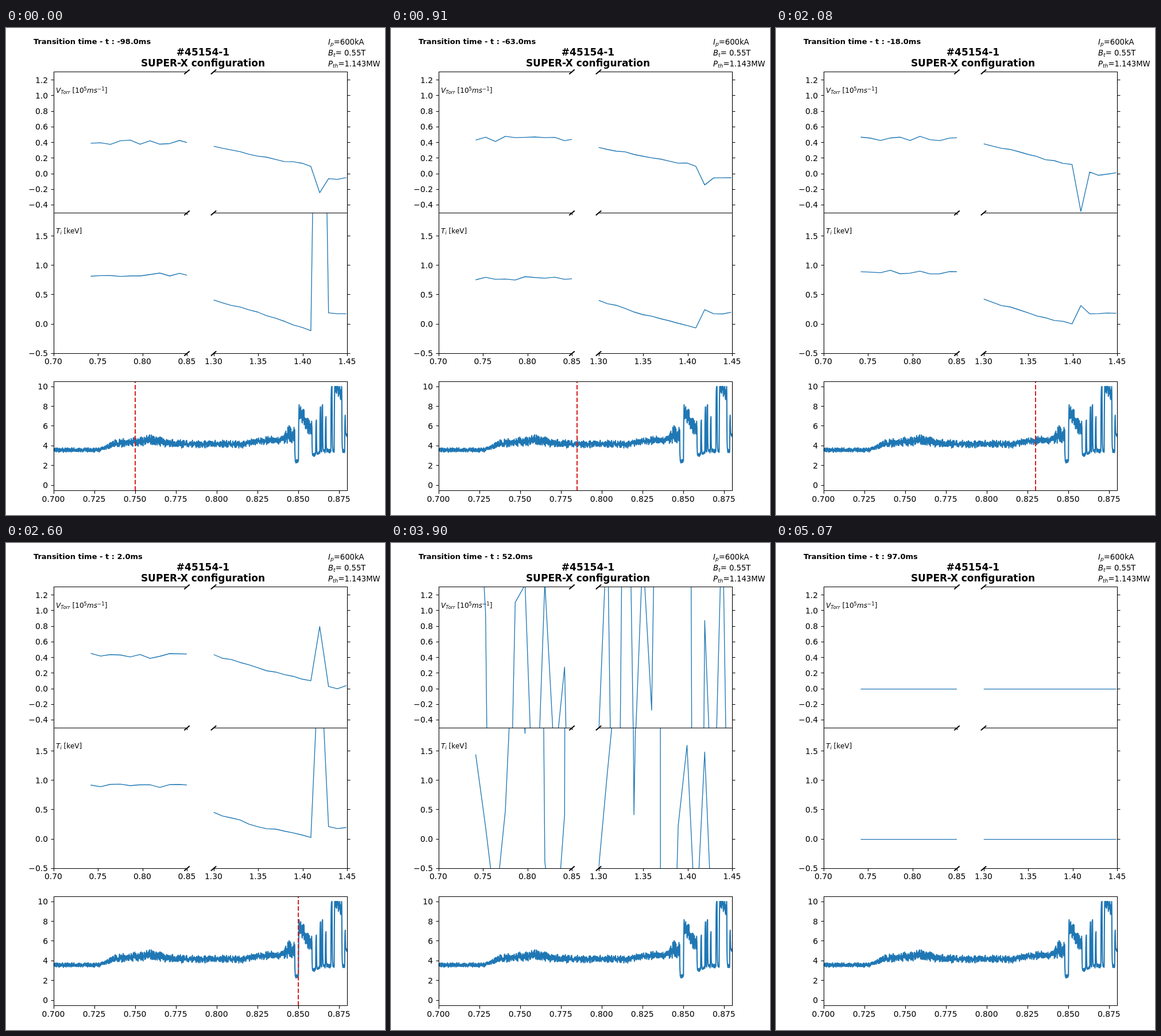
Animation of 660x849 px, one loop 5.2 s. Source, as an HTML page:

```html
<!DOCTYPE html>
<html lang="en">
<head>
<meta charset="utf-8">
<title>Transition profiles</title>
<style>
html, body { margin: 0; width: 100%; height: 100%; overflow: hidden; background: #fff; }
svg { display: block; font: 13.9px "DejaVu Sans", sans-serif; }
path { fill: none; }
.b { font-weight: bold; }
.i { font-style: italic; }
.axes { stroke: #000; stroke-width: 1.1; }
.curve { stroke: #1f77b4; stroke-width: 1.35; stroke-linejoin: round; }
</style>
</head>
<body>
<svg width="660" height="849" viewBox="0 0 660 849">
  <defs>
    <clipPath id="clipV"><path d="M82.5 77H315V322.5H82.5ZM361.5 77H594V322.5H361.5Z"/></clipPath>
    <clipPath id="clipT"><path d="M82.5 322.5H315V567.5H82.5ZM361.5 322.5H594V567.5H361.5Z"/></clipPath>
    <clipPath id="clipS"><path d="M82.5 616H594V807H82.5Z"/></clipPath>
  </defs>
  <path id="v" class="curve" clip-path="url(#clipV)"/>
  <path id="t" class="curve" clip-path="url(#clipT)"/>
  <g clip-path="url(#clipS)">
    <path id="signal" class="curve" style="stroke-width:2.08"/>
    <path id="cursor" stroke-width="2" stroke-dasharray="7.7 3.33"/>
  </g>
  <path id="axes" class="axes"/>
  <path id="breaks" stroke="#000" stroke-width="2"/>
  <g id="labels"></g>
  <text id="time" class="b" x="48" y="28" font-size="13"></text>
  <g class="b" font-size="17" text-anchor="middle">
    <text x="343" y="47.5">#45154-1</text>
    <text x="343" y="67">SUPER-X configuration</text>
  </g>
  <g font-size="13.2">
    <text x="561" y="28.5"><tspan class="i">I</tspan><tspan class="i" font-size="9.2" dy="2">p</tspan><tspan dy="-2">=600kA</tspan></text>
    <text x="561" y="48"><tspan class="i">B</tspan><tspan class="i" font-size="9.2" dy="2">t</tspan><tspan dy="-2">= 0.55T</tspan></text>
    <text x="561" y="66.5"><tspan class="i">P</tspan><tspan class="i" font-size="9.2" dy="2">th</tspan><tspan dy="-2">=1.143MW</tspan></text>
  </g>
  <g font-size="12.1">
    <text x="87" y="113"><tspan class="i">V</tspan><tspan class="i" font-size="8.5" dy="2">Torr</tspan><tspan dy="-2"> [10</tspan><tspan font-size="8.5" dy="-4.5">5</tspan><tspan class="i" dy="4.5">ms</tspan><tspan font-size="8.5" dy="-4.5">−1</tspan><tspan dy="4.5">]</tspan></text>
    <text x="87" y="358"><tspan class="i">T</tspan><tspan class="i" font-size="8.5" dy="2">i</tspan><tspan dy="-2"> [keV]</tspan></text>
  </g>
</svg>
<script>
const $ = id => document.getElementById(id);
const STEP = 130, COUNT = 40, EDGE = 26, WILD = 30;
const yV = v => 254.55 - v * 136.1;
const yT = v => 516.55 - v * 102.1;
const yS = v => 797.6 - v * 17.2;
const xS = s => 82.5 + (s - 0.7) * 511.5 / 0.18;
const lerp = (a, b, f) => a + (b - a) * f;
const clamp = f => Math.min(1, Math.max(0, f));
const ramp = (x, a, b) => clamp((x - a) / (b - a));

function seeded(seed) {
  return () => {
    seed = (seed * 1664525 + 1013904223) % 4294967296;
    return seed / 4294967296;
  };
}

// Evenly spaced samples on both sides of the axis break
const LEFT = 11, RIGHT = 16, MID = 5;
const xAt = j => j < LEFT ? 147.5 + 17.2 * j : 361.5 + 15.4 * (j - LEFT);

// How the levels of each profile drift, for u from 0 to 1
const velocity = u => ({
  left: 0.41 + 0.07 * Math.sin(Math.PI * u) - 0.04 * u,
  start: 0.36 - 0.2 * u + 0.39 * u * u,
  mid: 0.23 + 0.04 * u,
  low: 0.11,
  end: -0.05 + 0.09 * u
});
const temperature = u => ({
  left: 0.85 - 0.06 * Math.sin(2 * Math.PI * u),
  start: 0.42 - 0.12 * u + 0.22 * u * u,
  mid: 0.2 - 0.2 * u + 0.3 * u * u,
  low: -0.1 + 0.17 * u,
  end: 0.2
});

// Outlier near the outer edge: position among the right samples and its values
const spikes = [
  { step: 0, at: 12, v: -0.24, t: 10 },
  { step: 7, at: 12, v: -0.14, t: 0.25 },
  { step: 12, at: 11, v: -0.48, t: 0.32 },
  { step: 20, at: 12, v: 0.8, t: 3.4 },
  { step: 26, at: 14, v: -0.09, t: 0.39 }
];
const nearestSpike = n =>
  spikes.reduce((a, b) => Math.abs(b.step - n) < Math.abs(a.step - n) ? b : a);

function profile(levels, key, n, seed) {
  const rand = seeded(seed + n * 7919);
  rand();
  const noise = size => (rand() - 0.5) * size;
  const p = levels(clamp(n / EDGE)), spike = nearestSpike(n), last = spike.at - 1;
  return Array.from({ length: LEFT + RIGHT }, (_, j) => {
    const k = j - LEFT;
    if (n > WILD) return 0;
    if (n === WILD) return 1 + 2 * Math.tan(noise(Math.PI));
    if (k < 0) return p.left + noise(0.07);
    if (k === spike.at) return spike[key];
    if (k > last) return p.end + noise(0.05);
    return noise(0.03) + (k < MID ? lerp(p.start, p.mid, k / MID) : lerp(p.mid, p.low, (k - MID) / (last - MID)));
  });
}

const curve = (values, y) =>
  values.map((v, j) => (j % LEFT || j > LEFT ? 'L' : 'M') + xAt(j).toFixed(1) + ' ' + y(v).toFixed(2)).join('');

// Lower trace: a drifting noisy band, then pulses [from, to, height] above a floor
const BURST = 503;
const pulses = [
  [509.3, 533, 7.5], [539.5, 540.6, 6.8], [546.7, 548, 8.1], [550, 551.5, 8.3],
  [556.2, 557.5, 7], [566, 568, 10.2], [571.7, 585, 10.2], [590, 591, 7.3], [591, 595, 5.3]
];

function band(x) {
  const bump = Math.exp(-(((x - 245) / 35) ** 2)), rise = ramp(x, 160, 190), late = ramp(x, 478, 493);
  return {
    level: 3.6 + 0.6 * rise + 0.4 * bump + 0.4 * ramp(x, 410, 460) + 0.6 * late,
    spread: 0.22 + 0.15 * rise + 0.15 * bump + 0.5 * late
  };
}

function burst(x) {
  const pulse = pulses.find(([from, to]) => x >= from && x < to);
  if (!pulse) return { level: Math.min(3.5, 2.4 + (x - BURST) * 0.022), spread: 0.2 };
  const [from, to, height] = pulse;
  return { level: height - 0.08 * (x - from), spread: to - from > 5 ? 0.9 : 0.15 };
}

function drawSignal() {
  const rand = seeded(45);
  let d = '', value = 3.7;
  for (let x = 83; x <= 594; x += 0.25) {
    const { level, spread } = x < BURST ? band(x) : burst(x);
    value = lerp(value, level, 0.55);
    const y = Math.min(10.03, value + (rand() + rand() - 1) * spread * 1.15);
    d += (d ? 'L' : 'M') + x + ' ' + yS(y).toFixed(1);
  }
  $('signal').setAttribute('d', d);
}

function drawAxes() {
  let d = 'M83.5 76V568M594.5 76V568M83.5 616.5H594.5V806.5H83.5Z', marks = '', labels = '';
  const snapX = x => Math.floor(x + 0.5) + 0.5;
  const snapY = y => Math.ceil(y - 0.5) - 0.5;
  const label = (x, y, anchor, s) => labels += `<text x="${x}" y="${y}" text-anchor="${anchor}">${s}</text>`;
  const yTick = (y, v, digits, right) => {
    d += `M83.5 ${snapY(y)}h-5` + (right ? `M594.5 ${snapY(y)}h5` : '');
    label(73, y + 4.5, 'end', v.toFixed(digits).replace('-', '−'));
  };
  const xTick = (x, y, v, digits) => {
    d += `M${snapX(x)} ${y}v5`;
    label(x, y + 19, 'middle', v.toFixed(digits));
  };
  for (const y of [76.5, 322.5, 567.5]) {
    d += `M83 ${y}H315M361.5 ${y}H595`;
    for (const x of [315, 361.5]) marks += `M${x - 4.7} ${y + 4}l9.4 -8`;
  }
  d += 'M315.5 322v4';
  for (let k = -2; k <= 6; k++) yTick(yV(k / 5), k / 5, 1, true);
  for (let k = -1; k <= 3; k++) yTick(yT(k / 2), k / 2, 1, true);
  for (let k = 0; k <= 10; k += 2) yTick(yS(k), k, 0);
  for (let k = 0; k < 4; k++) {
    xTick(82.5 + k * 77.5, 567, 0.7 + k * 0.05, 2);
    xTick(361.5 + k * 77.5, 567, 1.3 + k * 0.05, 2);
  }
  for (let k = 0; k < 8; k++) xTick(xS(0.7 + k * 0.025), 807, 0.7 + k * 0.025, 3);
  $('axes').setAttribute('d', d);
  $('breaks').setAttribute('d', marks);
  $('labels').innerHTML = labels;
}

function draw(n) {
  $('time').textContent = `Transition time - t : ${(-98 + 5 * n).toFixed(1)}ms`;
  $('v').setAttribute('d', curve(profile(velocity, 'v', n, 11), yV));
  $('t').setAttribute('d', curve(profile(temperature, 't', n, 97), yT));
  const x = Math.round(xS(0.75 + n * 0.005));
  $('cursor').setAttribute('d', n <= EDGE ? `M${x} 806.5V616` : '');
  $('cursor').setAttribute('stroke', n < EDGE ? '#d81e1e' : '#222');
}

let shown = -1;
const start = performance.now();
function tick() {
  const n = Math.floor(Math.max(0, performance.now() - start) / STEP) % COUNT;
  if (n !== shown) draw(shown = n);
  requestAnimationFrame(tick);
}
drawAxes();
drawSignal();
tick();
</script>
</body>
</html>
```
